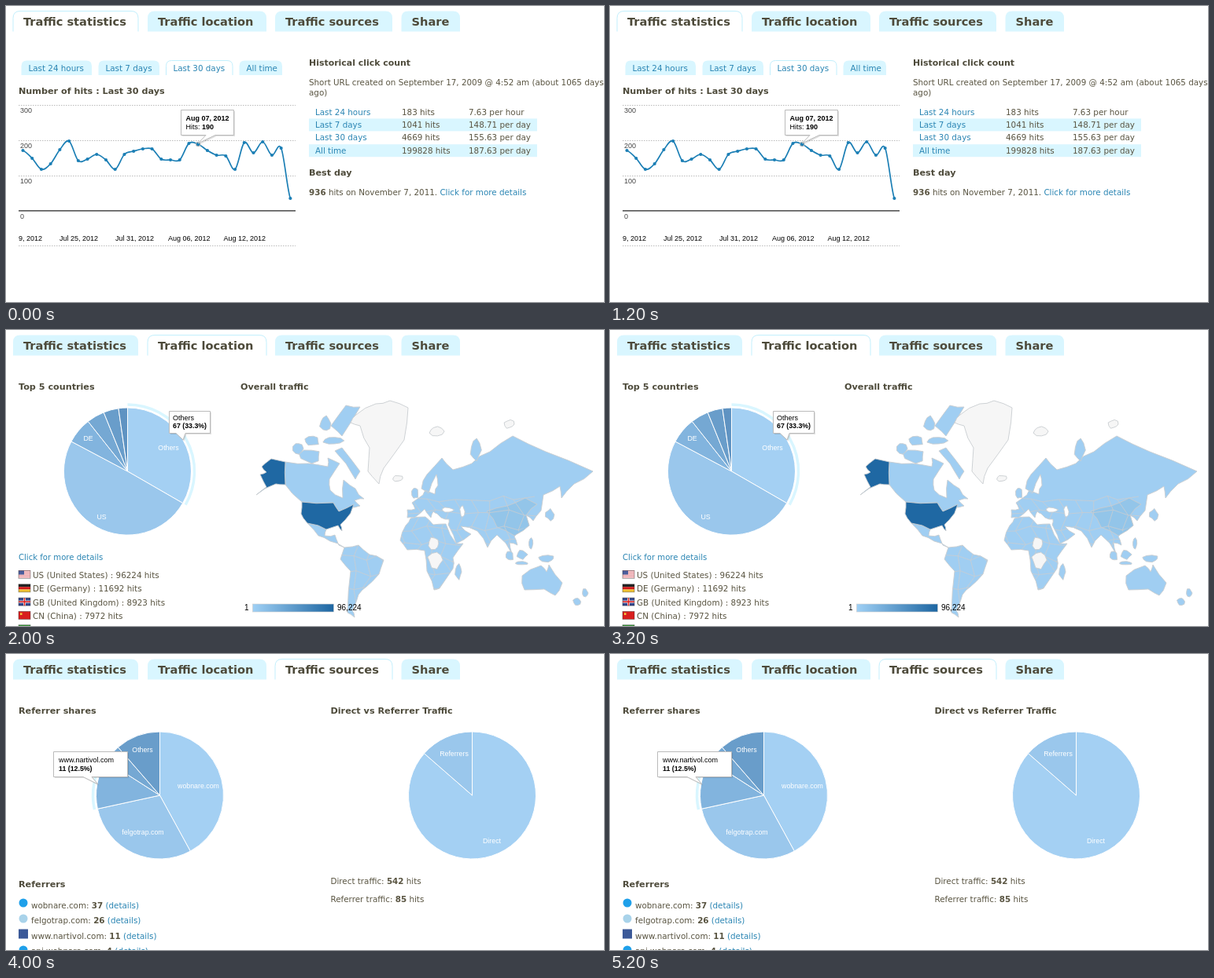
An HTML page that plays this animation: 760x377 px, repeating every 6 s.

```html
<!DOCTYPE html>
<html lang="en">
<meta charset="utf-8">
<title>Link statistics</title>
<style>
  html, body { margin: 0; width: 100%; height: 100%; overflow: hidden; background: #fff; }
  svg { display: block; }
  text { font: 10.35px "DejaVu Sans", sans-serif; fill: #595441; white-space: pre; }
  .b { font-weight: bold; }
  .h { font-weight: bold; font-size: 11.2px; fill: #4d4a3a; }
  .tab { font-weight: bold; font-size: 14.6px; fill: #4d4a3a; }
  .a { fill: #2a85b3; }
  .s, .sb { font: 9px "Liberation Sans", Arial, sans-serif; fill: #000; }
  .sb { font-weight: bold; }
  .axis { fill: #444; }
  .label { font: 8.8px "Liberation Sans", Arial, sans-serif; fill: #fff; text-anchor: middle; }
  .land path { fill: #a0cef2; stroke: #c9cdd1; stroke-width: .9; stroke-linejoin: round; }
  .land .dark { fill: #1f68a3; }
  .land .none { fill: #f6f6f6; }
  .land .sea { fill: #fff; }
  .land .mid { fill: #93c5e9; }
  .land .border { fill: none; stroke-width: .8; }
</style>
<svg id="stage" width="760" height="377" viewBox="0 0 760 377"></svg>
<script>
const PALE = '#d9f6ff', EDGE = '#c2effd', LINE = '#1c7fb5';
const SHADES = ['#a4d0f3', '#9ac7ec', '#82b4de', '#75a8d3', '#699dca', '#5f93c2'];

const text = (x, y, str, cls = '', extra = '') =>
  `<text x="${x}" y="${y}" class="${cls}" ${extra}>${str}</text>`;
const span = (cls, str) => `<tspan class="${cls}">${str}</tspan>`;
const rect = (x, y, w, h, fill, extra = '') =>
  `<rect x="${x}" y="${y}" width="${w}" height="${h}" fill="${fill}" ${extra}/>`;
const path = (d, extra) => `<path d="${d}" ${extra}/>`;
const rule = y => path(`M16 ${y}H368`, 'stroke="#bbb" stroke-dasharray="1.5 1.5"');

function tab(x, right, y, bottom, r, active) {
  const d = `M${x} ${bottom}V${y + r}Q${x} ${y} ${x + r} ${y}H${right - r}Q${right} ${y} ${right} ${y + r}V${bottom}`;
  return path(d, active ? `fill="#fff" stroke="${EDGE}"` : `fill="${PALE}"`);
}

const TABS = [[9, 168, 'Traffic statistics'], [180, 331, 'Traffic location'],
              [342, 491, 'Traffic sources'], [502.5, 577, 'Share']];
const header = active => TABS.map(([x, right, name], i) =>
  tab(x, right, 6.5, 32.5, 9, i === active) + text(x + 13, 25, name, 'tab')).join('');

// Callout box whose tail leaves the bottom edge between a and b and ends at the tip.
function callout(x, y, w, h, a, b, tipX, tipY, lines) {
  const d = `M${x} ${y}h${w}v${h}H${b}L${tipX} ${tipY}L${a} ${y + h}H${x}Z`;
  return path(d, 'transform="translate(1.5 1.5)" fill="#000" opacity=".12"') +
    path(d, 'fill="#fff" stroke="#bbb" stroke-linejoin="round"') + lines;
}

const polar = (cx, cy, r, deg) => {
  const a = deg * Math.PI / 180;
  return `${(cx + r * Math.sin(a)).toFixed(2)} ${(cy - r * Math.cos(a)).toFixed(2)}`;
};
const arc = (cx, cy, r, from, to) =>
  `${polar(cx, cy, r, from)}A${r} ${r} 0 ${+(to - from > 180)} 1 ${polar(cx, cy, r, to)}`;

// Angles run clockwise from the top; the chosen slice gets an outer band.
function pie(cx, angles, chosen) {
  const cy = 180;
  let out = '';
  for (let i = 0; i + 1 < angles.length; i++) {
    const [from, to] = [angles[i], angles[i + 1]];
    out += path(`M${cx} ${cy}L${arc(cx, cy, 81, from, to)}Z`, `fill="${SHADES[i]}" stroke="#fff"`);
    if (i === chosen) out += path('M' + arc(cx, cy, 85, from, to), `fill="none" stroke="${PALE}" stroke-width="3.5"`);
  }
  return out;
}

function lineChart() {
  const ys = [184, 194, 208, 201, 183, 172, 197, 195, 189, 196, 208, 189, 185, 182, 182,
              195, 196, 196, 175, 176, 184, 190, 191, 208, 174, 187, 173, 190, 181, 245];
  const step = 11.72, at = i => 21.5 + i * step;
  const slope = i => ((ys[i + 1] ?? ys[i]) - (ys[i - 1] ?? ys[i])) / 6;
  let d = `M${at(0)} ${ys[0]}`, dots = '';
  ys.forEach((y, i) => {
    if (i) d += `C${at(i - 1) + step / 3} ${ys[i - 1] + slope(i - 1)} ${at(i) - step / 3} ${y - slope(i)} ${at(i)} ${y}`;
    dots += `<circle cx="${at(i)}" cy="${y}" r="2.1" fill="${LINE}"/>`;
  });
  return path(d, `fill="none" stroke="${LINE}" stroke-width="1.7"`) + dots +
    `<circle cx="${at(19)}" cy="176" r="2.8" fill="${LINE}" stroke="#bbb"/>`;
}

function statistics() {
  const periods = [[19.5, 109, 'Last 24 hours', '183 hits', '7.63 per hour'],
                   [117.5, 195, 'Last 7 days', '1041 hits', '148.71 per day'],
                   [203.5, 288, 'Last 30 days', '4669 hits', '155.63 per day'],
                   [296.5, 351, 'All time', '199828 hits', '187.63 per day']];
  const dates = [[16, '9, 2012'], [68, 'Jul 25, 2012'], [139, 'Jul 31, 2012'],
                 [206, 'Aug 06, 2012'], [276.5, 'Aug 12, 2012']];
  return periods.map(([x, right, name, hits, rate], i) => {
      const y = 138.5 + i * 16.4;
      return tab(x, right, 69.5, 88, 7, i === 2) + text(x + 9, 83, name, 'a') +
        (i % 2 ? rect(385, y - 11.5, 290, 16, PALE) : '') +
        text(393, y, name, 'a') + text(503, y, hits) + text(588, y, rate);
    }).join('') +
    text(16, 112, 'Number of hits : Last 30 days', 'h') +
    [126.5, 171.5, 216.5, 305.5].map(rule).join('') +
    rect(16, 260, 352, 1.6, '#555') +
    [300, 200, 100, 0].map((n, i) => text(18, 136 + 45 * i, n, 's axis')).join('') +
    dates.map(([x, name]) => text(x, 299, name, 's')).join('') +
    lineChart() +
    callout(222.5, 132.5, 67, 32, 254, 266, 244, 175,
      text(228.5, 146, 'Aug 07, 2012', 'sb') + text(228.5, 157, 'Hits: ' + span('sb', '190'), 's')) +
    text(385, 76, 'Historical click count', 'h', 'style="font-size:10.95px"') +
    text(385, 101, 'Short URL created on September 17, 2009 @ 4:52 am (about 1065 days') +
    text(385, 114, 'ago)') +
    text(385, 216, 'Best day', 'h') +
    text(385, 241, span('b', '936') + ' hits on November 7, 2011. ' + span('a', 'Click for more details'));
}

// Repeatable noise in -1..1 for a place, so neighbours share the same frontier.
const noise = (x, y) => {
  const v = Math.sin(x * 12.9898 + y * 78.233) * 43758.5453;
  return 2 * (v - Math.floor(v)) - 1;
};

// Roughens every edge of a coarse outline with one displaced midpoint.
function coast(outline) {
  const n = outline.split(' ').map(Number), pts = [];
  for (let i = 0; i < n.length; i += 2) {
    const [x, y] = [n[i], n[i + 1]], [u, v] = [n[(i + 2) % n.length], n[(i + 3) % n.length]];
    const mx = (x + u) / 2, my = (y + v) / 2, k = Math.min(1.8, Math.hypot(u - x, v - y) * .1);
    pts.push(`${x} ${y}`, `${mx + k * noise(mx, my)} ${my + k * noise(my, mx)}`);
  }
  return `M${pts.join('L')}Z`;
}
const land = (outline, cls = '') => path(coast(outline), `class="${cls}"`);

function island(x, y, rx, ry, cls = '') {
  const pts = Array.from({ length: 9 }, (_, i) => {
    const a = i * Math.PI / 4.5, k = 1 + .22 * noise(x + i, y);
    return `${x + rx * k * Math.cos(a)} ${y + ry * k * Math.sin(a)}`;
  });
  return path(`M${pts.join('L')}Z`, `class="${cls}"`);
}

// Irregular brickwork of frontiers, clipped to the continents.
function frontiers() {
  const size = 19;
  const at = (i, j) => {
    const x = 420 + i * size + (j % 2) * size / 2, y = 214 + j * size;
    return `${x + 5 * noise(i, j)} ${y + 5 * noise(j, i + 9)}`;
  };
  let d = '';
  for (let j = 0; j < 7; j++) for (let i = 0; i < 13; i++)
    d += `M${at(i, j)}L${at(i + 1, j)}M${at(i, j)}L${at(i, j + 1)}`;
  return path(d, 'class="border" clip-path="url(#continents)"');
}

function worldMap() {
  const southAmerica = land('430 277 448 274 462 286 480 293 474 311 458 327 448 337 440 357 443 366 434 360 438 307 425 292');
  const africa = land('514 240 533 238 543 248 559 247 572 272 581 272 568 290 568 304 551 329 544 331 535 307 532 281 510 280 501 268 508 249');
  const eurasia = land('510 239 510 229 520 228 516 220 530 210 533 204 545 209 549 198 547 184 537 208 528 202 535 184 554 163 568 178 592 170 615 155 644 135 686 155 746 180 722 196 706 214 704 199 683 210 680 230 670 243 661 236 665 249 646 263 650 274 640 271 643 285 624 261 612 277 599 256 578 250 591 260 572 272 562 248 563 241 553 239 548 234 543 231 540 239 532 228 519 239');
  const canada = land('355 168 385 170 409 174 409 163 424 170 411 190 412 204 428 214 429 191 444 202 455 215 443 217 450 224 437 226 423 231 416 220 376 219 355 197');
  const alaska = land('355 168 337 164 325 174 331 181 323 184 331 200 318 210 343 196 355 197', 'dark');
  const usa = land('376 219 416 220 423 231 442 222 431 242 425 248 427 256 422 249 407 254 383 246 375 234', 'dark');
  const mexico = land('383 246 407 254 405 262 418 261 423 274 430 277 412 269 397 262');
  const greenland = land('438 118 445 108 470 94 488 90 511 99 506 140 480 176 474 196 460 180 462 150 450 122', 'none');
  const arctic = land('418 154 427 150 450 180 444 190 432 170') + land('413 122 432 96 450 98 427 135') +
    island(386, 161, 13, 8) + island(371, 151, 6, 7) + island(389, 141, 9, 6) +
    island(416, 141, 12, 5) + island(406, 119, 7, 10);
  const china = land('611 231 637 224 660 214 675 222 661 236 665 249 646 262 624 251', 'mid');
  const australia = land('659 331 656 313 680 300 687 308 690 299 707 322 698 338 684 330');
  const north = island(520, 208, 4, 7) + island(498, 189, 7, 4, 'none') +
    island(597, 153, 6, 13) + island(547, 129, 9, 6, 'none') + island(640, 120, 6, 5, 'none');
  const lakes = island(562, 229, 7, 3, 'sea') + island(580, 231, 3, 7, 'sea');
  const blank = island(546, 293, 9, 10, 'none') + island(544, 272, 7, 8, 'none');
  const pacific = island(691, 235, 5, 7) + island(667, 272, 3, 7) + island(640, 288, 5, 6) +
    island(655, 297, 8, 2) + island(656, 286, 6, 6) + island(687, 291, 10, 4) +
    island(736, 335, 4, 5) + island(726, 346, 5, 5);
  return '<g class="land">' +
    `<clipPath id="continents">${southAmerica + africa + eurasia}</clipPath>` +
    southAmerica + africa + eurasia + canada + arctic + mexico + alaska + usa + greenland +
    china + frontiers() + blank + lakes + island(575, 308, 4, 9) + australia + north + pacific + '</g>';
}

// Each flag is a list of [x, y, width, height, colour] bands on a 15 by 10 field.
const STRIPES = [0, 2, 4, 6, 8].flatMap(y => [[0, y, 15, 1, '#d8434e'], [0, y + 1, 15, 1, '#fff']]);
const FLAGS = [
  [...STRIPES, [0, 0, 7, 5, '#4a5d9c']],
  [[0, 0, 15, 3.4, '#222'], [0, 3.4, 15, 3.3, '#d01818'], [0, 6.7, 15, 3.3, '#f0c030']],
  [[0, 0, 15, 10, '#33478c'], [6, 0, 3, 10, '#fff'], [0, 3.5, 15, 3, '#fff'],
   [6.7, 0, 1.6, 10, '#d22'], [0, 4.2, 15, 1.6, '#d22']],
  [[0, 0, 15, 10, '#d81e1e'], [2, 2, 2.5, 2.5, '#f4d03f']],
  [[0, 0, 15, 10, '#3a9a3a']],
];
const COUNTRIES = ['US (United States) : 96224 hits', 'DE (Germany) : 11692 hits',
                   'GB (United Kingdom) : 8923 hits', 'CN (China) : 7972 hits', 'BR (Brazil) : 7014 hits'];

function locations() {
  return text(16, 76, 'Top 5 countries', 'h') + text(298, 76, 'Overall traffic', 'h') +
    pie(154.5, [0, 120, 298, 321.7, 338, 351.8, 360], 0) +
    text(206.5, 153, 'Others', 'label') + text(104.5, 141, 'DE', 'label') + text(121.5, 241, 'US', 'label') +
    callout(207.5, 103.5, 52, 28, 216, 228, 225, 140,
      text(212, 115, 'Others', 's') + text(212, 125, '67 (33.3%)', 'sb', 'style="font-size:8.8px"')) +
    text(16, 293, 'Click for more details', 'a', 'style="font-size:10.1px"') +
    COUNTRIES.map((name, i) => {
      const y = 306.5 + i * 17.3;
      return FLAGS[i].map(([bx, by, w, h, fill]) => rect(16 + bx, y + by, w, h, fill)).join('') +
        rect(16, y, 15, 10, 'none', 'stroke="#333" stroke-opacity=".5" stroke-width=".8"') +
        text(34, y + 9.5, name);
    }).join('') +
    worldMap() +
    '<linearGradient id="scale"><stop stop-color="#9fd0f5"/><stop offset="1" stop-color="#1d66a2"/></linearGradient>' +
    rect(313.5, 349, 103, 10, 'url(#scale)', 'stroke="#ccc" stroke-width=".6"') +
    text(303, 357, '1', 's', 'style="font-size:10px"') + text(421, 357, '96,224', 's', 'style="font-size:10px"');
}

const REFERRERS = [['wobnare.com', 37], ['felgotrap.com', 26], ['www.nartivol.com', 11], ['api.wobnare.com', 4]];

function sources() {
  const disc = (y, fill) => `<circle cx="22" cy="${y}" r="5.5" fill="${fill}"/>`;
  return text(16, 76, 'Referrer shares', 'h') + text(412.5, 76, 'Direct vs Referrer Traffic', 'h') +
    pie(195.5, [0, 151.4, 257.7, 302.7, 319.1, 360], 2) +
    text(244.5, 171, REFERRERS[0][0], 'label') + text(174, 230, REFERRERS[1][0], 'label') +
    text(173.5, 124.5, 'Others', 'label') +
    callout(60.5, 124.5, 94, 32, 98, 109, 117, 166,
      text(67, 138, REFERRERS[2][0], 's') + text(67, 149, '11 (12.5%)', 'sb', 'style="font-size:8.8px"')) +
    pie(592.5, [0, 311.2, 360]) +
    text(617.5, 241, 'Direct', 'label') + text(569.5, 129.5, 'Referrers', 'label') +
    text(412.5, 293, `Direct traffic: ${span('b', 542)} hits`) +
    text(412.5, 316, `Referrer traffic: ${span('b', 85)} hits`) +
    text(16, 296.5, 'Referrers', 'h') +
    disc(317, '#1fa0ea') + disc(337, '#a9d3ea') + rect(16, 350.5, 12, 12, '#3b5998') + disc(377, '#1fa0ea') +
    REFERRERS.map(([host, hits], i) =>
      text(32, 323.5 + i * 19.6, `${host}: ${span('b', hits)} ${span('a', '(details)')}`)).join('');
}

const stage = document.getElementById('stage');
stage.innerHTML = [statistics, locations, sources].map((page, i) => `<g>${header(i)}${page()}</g>`).join('');
const pages = [...stage.children];

function draw(now) {
  const current = Math.floor(now / 2000) % pages.length;
  pages.forEach((page, i) => page.style.display = i === current ? '' : 'none');
  requestAnimationFrame(draw);
}
draw(performance.now());
</script>
</html>
```
